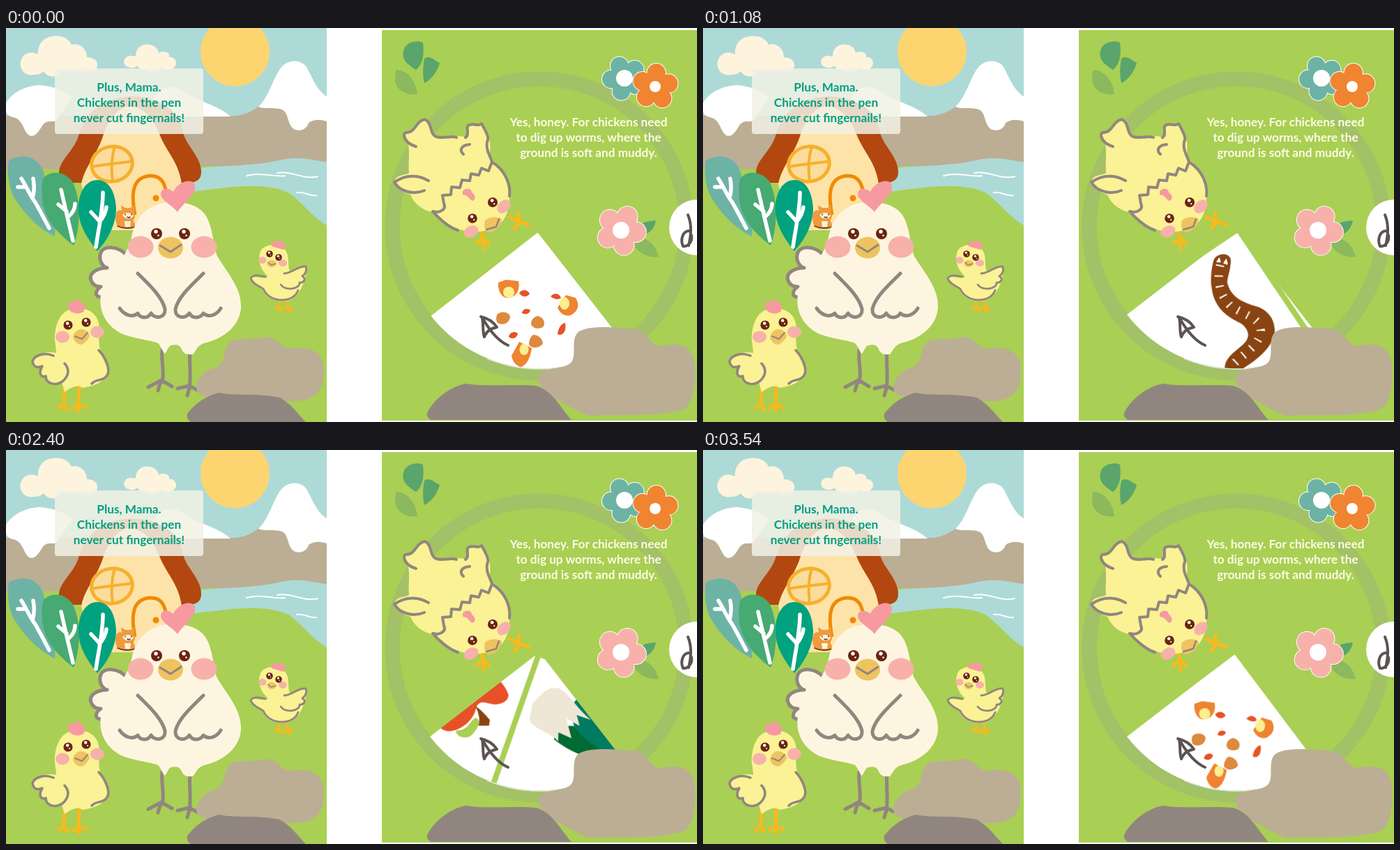
Animation, 991 px wide and 565 px high, one loop 4.17 s. Source, as an HTML page:

```html
<!DOCTYPE html>
<html lang="en">
<head>
<meta charset="utf-8">
<title>Chickens and the feed wheel</title>
<style>
html, body { margin: 0; width: 100%; height: 100%; overflow: hidden; background: #fff; }
svg { display: block; width: 100vw; height: 100vh; }
text { font: 700 17.2px Lato, "Open Sans", sans-serif; text-anchor: middle; }
.line { fill: none; stroke: #91867f; stroke-linecap: round; stroke-linejoin: round; }
.foot { fill: none; stroke: #f9b91c; stroke-linecap: round; stroke-linejoin: round; }
.ink { fill: none; stroke: #5b5453; stroke-width: 4; stroke-linecap: round; stroke-linejoin: round; }
.vein { fill: none; stroke: #fff; stroke-width: 5.5; stroke-linecap: round; stroke-linejoin: round; }
.ripple { fill: none; stroke: #fff; stroke-width: 2; stroke-linecap: round; }
.sky { fill: #addad7; } .grass { fill: #a9cf54; } .sand { fill: #bcae94; } .stone { fill: #91867f; }
.cream { fill: #fef5e1; } .chick { fill: #faf294; } .cheek { fill: #f7b1aa; } .comb { fill: #f799a0; } .beak { fill: #efc35f; }
#wheel { animation: turn 4170ms -1ms infinite; }
/* one quarter turn per dish, in 30 ms ticks */
@keyframes turn {
  0% { transform: rotate(0deg); animation-timing-function: steps(25, end); }
  17.98561% { transform: rotate(90deg); }
  25.17986% { transform: rotate(90deg); animation-timing-function: steps(22, end); }
  41.00719% { transform: rotate(180deg); }
  47.48201% { transform: rotate(180deg); animation-timing-function: steps(22, end); }
  63.30935% { transform: rotate(270deg); }
  70.50360% { transform: rotate(270deg); animation-timing-function: steps(20, end); }
  84.89209%, 100% { transform: rotate(361deg); }
}
</style>
</head>
<body>
<svg viewBox="0 0 991 565" preserveAspectRatio="none">
<defs>
  <g id="eye"><circle r="8" fill="#6b2410"/><circle cx="-1" cy="-3" r="2.7" fill="#fff"/><circle cx="2.5" cy="2.5" r="1.3" fill="#fff"/></g>
  <clipPath id="window"><path d="M765 290L608 411A199 199 0 0 0 887 447Z"/></clipPath>
</defs>

<!-- left page -->
<rect class="sky" width="460" height="565"/>
<circle cx="328.5" cy="34" r="49.5" fill="#fcd571"/>
<path fill="#fef4dd" d="M40 67C25 70 17 55 22 45C26 35 38 33 46 38C45 25 52 14 66 12C78 10 90 14 94 24C104 21 116 28 116 42C128 42 134 50 130 58C126 66 112 68 106 60C98 66 86 64 82 60C76 70 62 74 54 62C50 66 46 67 40 67ZM176 56C168 55 167 44 174 41C180 38 184 42 186 40C186 28 196 22 206 24C214 25 218 30 219 36C224 32 236 34 234 42C242 40 246 50 243 54C238 62 228 62 224 57C218 64 208 68 202 60C196 62 190 57 188 54C184 58 180 58 176 56Z"/>
<path class="sand" d="M0 126H330C345 124 355 118 363 112L460 100V220H0Z"/>
<path fill="#fff" d="M0 108C8 92 30 82 50 82C70 84 85 90 95 100L75 128C70 140 60 128 52 140C45 152 38 160 30 151C24 142 22 130 10 128C3 126 0 122 0 118ZM200 127C215 80 235 75 262 96C285 108 305 112 322 127ZM362 113C378 98 384 68 396 55C408 44 424 46 431 56C440 72 446 90 460 98V134C448 130 440 132 434 136C431 146 421 149 413 145C403 138 406 122 396 117C384 113 372 117 362 113Z"/>
<path class="grass" d="M0 204C40 200 70 203 100 203C180 200 230 200 280 198H460V565H0Z"/>
<path class="sky" d="M265 202C310 196 350 200 400 188C425 184 440 190 460 192V283C440 272 425 250 405 236C370 220 320 228 265 235Z"/>
<path class="ripple" d="M345 212C365 206 385 214 400 212M389 208C410 204 425 218 447 213M417 236C430 234 435 242 445 240"/>

<path fill="#b2480f" d="M76 208C76 190 96 178 104 155C112 125 135 100 180 98C225 100 250 120 254 150C258 168 280 185 280 206C280 220 270 222 257 222H95C84 222 77 216 76 208Z"/>
<path fill="#fee3a8" d="M108 224C112 200 132 180 140 152C150 125 165 112 178 112C195 112 212 130 220 152C230 178 248 192 252 224L245 290H125Z"/>
<g fill="none" stroke="#f6b02e" stroke-width="5">
  <ellipse cx="152" cy="195" rx="29.5" ry="25" fill="#fbdc9c" transform="rotate(-10 152 195)"/>
  <path stroke-width="4" d="M156 170C151 185 151 205 153 220M123 199C142 195 165 194 181 191"/>
</g>
<path fill="none" stroke="#f08a00" stroke-width="5" d="M185 268C178 232 184 214 206 212C224 211 229 224 231 244"/>
<circle cx="215" cy="244" r="4.5" fill="#f08a00"/>
<g>
  <path fill="#ef9a3c" d="M160 284C154 272 158 258 166 262L165 254L171 258L178 258L184 255L184 265C188 272 180 274 184 279C188 286 180 288 172 286Z"/>
  <path fill="#fff3dc" d="M167 268C171 264 179 264 183 269C180 275 170 275 167 268ZM170 277H179L178 285H171Z"/>
  <path fill="none" stroke="#6b3a1a" stroke-width="1.6" stroke-linecap="round" d="M171 267V268M180 267V268M174 271L176 272L178 271M160 284C168 288 178 288 185 285"/>
</g>

<path fill="#6db3a5" d="M4 190C20 180 50 180 56 215C60 245 73 270 70 299C45 287 25 265 10 240C2 220 2 205 4 190Z"/>
<path class="vein" d="M22 216C30 228 34 240 42 250C50 264 56 276 62 287M28 228L17 228M38 244C41 234 41 226 39 216"/>
<path fill="#46aa72" d="M54 215C65 203 85 206 95 220C108 245 107 285 97 312C75 295 55 275 52 245C51 230 51 222 54 215Z"/>
<path class="vein" d="M79 232C85 258 90 280 96 305M87 263L75 253M90 270C97 264 99 258 99 252"/>
<path fill="#00a27f" d="M131 218C150 218 158 240 158 262C156 290 140 310 131 320C115 300 103 280 104 258C104 235 115 218 131 218Z"/>
<path class="vein" d="M139 236C139 262 133 285 129 314M134 277L122 264M134 278C141 270 143 264 144 257"/>

<path class="line" style="fill:#fef5e1" stroke-width="5" d="M172 325C160 312 140 312 136 322C132 332 138 342 145 344C130 344 118 352 122 362C125 370 132 371 136 371C128 376 126 386 137 386"/>
<path class="line" stroke-width="5" d="M224 462C222 480 228 492 224 508M204 515L223 505L238 514M222 506L218 520M264 462C262 480 266 495 263 518M246 517L263 513L274 519M263 516L260 527"/>
<path class="cream" d="M237 250C205 250 186 270 180 300C174 330 150 345 140 368C128 398 140 425 165 438C185 446 210 448 218 452C222 456 224 462 227 467C231 466 232 456 237 455C245 453 250 455 252 461C256 470 264 468 268 468C272 464 274 455 284 452C315 445 336 425 337 400C338 370 312 345 302 325C295 300 296 270 275 258C262 250 250 250 237 250Z"/>
<path class="comb" d="M246 264C238 254 222 247 222 238C222 229 233 228 240 235C244 224 262 214 270 223C276 238 254 250 246 264Z"/>
<ellipse class="cheek" cx="193" cy="314" rx="18.5" ry="15.5"/><ellipse class="cheek" cx="284" cy="314" rx="18.5" ry="15.5"/>
<ellipse class="beak" cx="236" cy="315" rx="18" ry="15.5"/>
<path class="line" stroke-width="3" d="M221 312L236 321L251 311"/>
<use href="#eye" x="216" y="295"/><use href="#eye" x="256" y="295"/>
<path class="line" stroke-width="5" d="M189 352C205 368 224 385 228 403C229 416 214 418 208 409C203 418 192 416 189 409C182 416 170 412 163 402M283 352C267 368 247 385 243 403C242 416 257 418 263 409C268 418 279 416 283 409C290 416 302 412 308 402"/>

<path class="sand" d="M277 525C268 515 276 500 290 490C318 485 310 465 318 455C325 440 350 450 372 443C392 444 394 460 408 460C428 456 448 460 454 478C458 495 456 520 440 529C415 542 380 530 340 536C310 536 290 530 277 525Z"/>
<path class="stone" d="M260 553C270 540 285 528 305 523C330 528 360 523 393 530C410 540 420 555 430 565H265C260 562 259 557 260 553Z"/>

<path class="foot" stroke-width="5" d="M84 515L83 542M76 545L83 540L88 547M105 513L104 542M96 545L104 540L115 544M104 540V549"/>
<path class="chick" d="M72 466C55 462 40 470 38 478C40 488 46 487 52 485C46 495 50 502 58 500C58 510 68 512 80 508L84 522C98 512 106 512 109 516C128 514 142 506 146 496C146 480 130 465 134 440C136 415 125 402 102 402C80 402 72 420 70 440C69 450 72 456 72 466Z"/>
<path class="line" stroke-width="3.5" d="M68 470C55 464 40 470 38 478C40 488 46 487 52 485C46 495 50 502 57 499C57 512 75 514 84 504C89 498 92 490 84 481M133 462C144 474 150 490 145 498C138 508 130 502 123 510"/>
<path class="comb" d="M90 404C87 394 93 389 99 394C101 386 107 388 107 394C114 393 115 400 111 407C104 411 96 410 90 404Z"/>
<ellipse class="cheek" cx="81" cy="443" rx="10" ry="8.5"/><ellipse class="cheek" cx="131" cy="436" rx="10" ry="8.5"/>
<path class="beak" d="M96 444C98 434 106 431 109 432C116 433 120 438 120 442C116 450 110 454 107 454C101 453 98 449 96 444Z"/>
<path class="line" stroke-width="2" d="M99 442L109 446L117 437"/>
<use href="#eye" transform="translate(89 426) scale(.82)"/><use href="#eye" transform="translate(115 422) scale(.82)"/>

<path class="foot" stroke-width="3.5" d="M392 388V402M386 402L392 400L396 406M403 390L405 403M398 403L405 401L411 403M405 402V408"/>
<path class="chick" d="M365 320C370 308 400 306 404 326C406 338 404 344 408 350C418 346 426 342 431 344C430 366 420 386 404 391C384 394 370 384 368 374C360 370 352 366 351 358C358 354 368 362 376 356C366 348 360 334 365 320Z"/>
<path class="line" stroke-width="2.8" d="M399 352C410 352 420 340 430 342C432 350 428 354 425 356C432 360 426 366 421 365C422 374 402 378 394 368M372 357C362 354 354 354 351 359C354 368 364 370 369 374C374 386 386 390 396 390C408 390 416 384 419 376"/>
<path class="comb" d="M381 313C378 306 386 304 389 308C391 302 396 304 396 308C402 307 402 314 398 318Z"/>
<ellipse class="cheek" cx="368" cy="333" rx="5.5" ry="5"/><ellipse class="cheek" cx="397" cy="337" rx="6" ry="5"/>
<ellipse class="beak" cx="381" cy="338" rx="6.5" ry="5"/>
<path class="line" stroke-width="1.5" d="M376 336L380 340L387 338"/>
<use href="#eye" transform="translate(378 324) scale(.6)"/><use href="#eye" transform="translate(391 329) scale(.6)"/>

<rect x="70" y="58" width="213" height="94" rx="4" fill="#f1f1e5" fill-opacity=".86"/>
<g fill="#009e80"><text x="176.5" y="91">Plus, Mama.</text><text x="176.5" y="113">Chickens in the pen</text><text x="176.5" y="135">never cut fingernails!</text></g>

<!-- right page -->
<rect class="grass" x="539" y="3" width="452" height="560"/>
<circle cx="765" cy="284" r="211" fill="none" stroke="#a3c166" stroke-width="21"/>
<path fill="#5aa56b" d="M570 33C572 20 590 17 598 21C600 38 598 52 588 60C575 52 567 45 570 33ZM600 44C608 38 616 48 622 50C618 65 608 75 600 79C597 66 598 55 600 44ZM903 296C905 278 920 277 932 276C930 290 918 300 903 296Z"/>
<path fill="#8cb85e" d="M559 60C575 60 588 75 590 95C575 97 560 90 558 75ZM897 303C915 296 931 308 936 328C920 330 903 322 897 303Z"/>
<g id="flowers"></g>
<circle cx="991" cy="286" r="40" fill="#fff"/>
<path class="ink" d="M978 268C984 282 983 296 979 312M981 291C970 290 967 304 971 313C978 314 985 306 983 297"/>

<path class="foot" stroke-width="5" d="M680 290L685 302L675 308M685 302L685 317M685 302L693 309M722 271L736 278L735 266M736 278L750 282M736 278L729 288"/>
<path class="chick" d="M572 152C590 150 585 133 601 131C612 137 608 152 617 156C630 160 645 152 662 157C668 152 658 142 666 140C680 134 690 142 692 156C696 166 694 178 693 186C718 203 724 225 722 245C722 262 715 285 690 290C660 298 632 285 614 264C600 263 586 254 580 239C570 236 560 230 557 220C560 210 570 212 578 208C576 190 582 172 572 152Z"/>
<path class="line" stroke-width="4" d="M588 170C574 166 567 154 573 150C589 150 586 134 601 131C612 137 607 152 617 156C628 159 638 154 646 157M659 157C666 152 658 142 664 139C674 136 678 142 682 137C688 148 694 158 690 163C688 176 694 182 697 192M665 167C652 168 650 176 656 181M606 219C594 212 576 208 557 221C564 234 584 240 600 233"/>
<path class="line" stroke-width="4" d="M648 290C634 286 618 270 612 263C622 266 632 260 628 252L626 240L638 239L639 228L651 229L654 218L665 219L667 209L678 211L682 201L692 205L697 192C716 204 724 224 722 241"/>
<path class="comb" d="M655 234C660 228 668 230 668 236C674 240 674 246 669 248C664 246 664 240 655 239Z"/>
<ellipse class="cheek" cx="667" cy="292" rx="11" ry="8" transform="rotate(-25 667 292)"/><ellipse class="cheek" cx="714" cy="256" rx="11" ry="8" transform="rotate(-45 714 256)"/>
<path class="beak" d="M687 276C694 270 706 270 711 275C710 285 700 294 691 293C686 290 685 282 687 276Z"/>
<path class="line" stroke-width="2.5" d="M689 289L703 285L707 274"/>
<use href="#eye" transform="translate(669 273) scale(.85)"/><use href="#eye" transform="translate(698 250) scale(.88)"/>

<g clip-path="url(#window)">
<g transform="translate(765 290)">
<g id="wheel">
  <circle r="199" fill="#fff"/>
  <g stroke="#a9cf54" stroke-width="8">
    <path transform="rotate(-38)" d="M0 -3V202"/>
    <path transform="rotate(-128)" d="M3 -3V202"/>
    <path transform="rotate(-218)" d="M0 -3V202"/>
    <path transform="rotate(52)" d="M-3 -3V202"/>
  </g>
  <g transform="translate(-765 -290)">
    <path fill="#ee8430" d="M706 365L717 361L735 363C738 378 730 386 720 387C712 388 705 378 706 365ZM803 383L817 387C823 397 821 406 810 412C800 414 794 408 791 401ZM736 450L754 459C752 475 745 485 738 486C730 484 726 476 725 470Z"/>
    <g fill="#faf08f"><circle cx="721" cy="379" r="8"/><ellipse cx="801" cy="395" rx="7" ry="9"/><ellipse cx="743" cy="461" rx="6.5" ry="8"/></g>
    <path fill="#dd8a3e" d="M705 410C712 405 722 408 723 414C722 424 712 427 705 423C702 418 703 413 705 410ZM762 413C770 414 775 422 770 429C762 433 753 430 753 423C754 417 758 414 762 413ZM756 440C764 440 770 446 770 453C764 460 754 460 750 454C750 448 752 443 756 440Z"/>
    <path fill="#e85127" d="M736 380C740 374 748 375 751 381C748 386 740 387 736 380ZM781 385C786 379 793 380 796 387C791 391 785 388 781 385ZM740 409C741 402 748 401 752 405C750 411 744 411 740 409ZM721 443C722 436 730 434 734 438C733 445 726 447 721 443ZM791 439C792 430 797 423 802 423C804 434 799 443 791 439Z"/>
  </g>
  <g transform="rotate(-94.09) translate(-765 -290)" fill="none">
    <path fill="#8a4412" d="M732 334C736 322 756 321 757 333C757 348 751 358 752 366C758 388 776 394 796 400C812 406 821 420 820 437C816 458 798 474 772 490L748 489C748 470 768 462 778 450C786 440 780 430 772 424C756 416 742 408 734 390C726 370 728 350 732 334Z"/>
    <path stroke="#fff" stroke-width="12" stroke-dasharray="2 13" stroke-dashoffset="-20" d="M743 335C736 360 740 382 756 398C776 412 798 414 800 434C798 456 776 466 761 482"/>
    <path stroke="#fff" stroke-width="3" stroke-linecap="round" d="M738 335L740 332L741 335M748 337L750 334L751 338"/>
  </g>
  <g transform="rotate(-184.09) translate(-765 -290)">
    <path fill="#a9cf54" d="M785 420C795 412 802 432 802 442C798 455 788 457 783 453C794 440 784 430 785 420Z"/>
    <path fill="#e85127" d="M706 383C700 375 704 364 716 363C732 362 742 368 751 365C758 359 775 358 787 362C795 368 792 380 785 388C776 396 768 400 774 410C788 425 787 450 777 463C765 475 740 471 720 457C705 450 694 446 694 434C699 424 694 412 695 402C697 394 703 390 706 383Z"/>
    <path fill="#faf294" d="M724 378L735 374L740 366L749 376L758 377L753 392L742 398L730 391Z"/>
    <path fill="#8a4412" d="M771 410C782 406 792 406 800 405L806 411L797 423C790 414 780 411 771 410Z"/>
  </g>
  <g transform="rotate(-274.55) translate(-765 -290)">
    <path fill="#006b32" d="M706 402C720 390 740 395 750 420C758 445 760 465 749 467C725 455 712 425 706 402Z"/>
    <path fill="#007a60" d="M740 405C750 380 765 370 775 380C797 400 812 430 810 453C804 477 780 482 758 474C752 455 738 430 740 405Z"/>
    <path fill="#efe7d6" d="M694 364C696 352 703 355 708 346C716 339 728 341 738 339C751 341 757 346 759 357C762 372 760 392 765 412L753 394L747 409L738 389L727 416L717 398L709 408C708 392 697 382 694 364Z"/>
  </g>
</g>
</g>
</g>
<path fill="none" stroke="#e2e6dc" stroke-width="1.5" d="M690 474A199 199 0 0 0 815 483"/>
<path class="ink" d="M720 455C706 449 695 436 684 417M681 414C690 416 698 420 704 429C696 431 690 433 686 443C683 434 685 424 683 416"/>
<path class="sand" d="M764 498C775 485 800 490 810 480C820 470 808 445 822 435C840 425 880 430 905 432C925 440 922 455 940 456C960 451 980 453 986 473C991 490 990 530 975 545C940 560 870 553 835 556C800 540 775 525 766 512C763 505 763 502 764 498Z"/>
<path class="stone" d="M604 552C615 530 640 513 660 510C690 515 730 510 760 513C785 520 795 545 811 562H609C605 559 603 556 604 552Z"/>
<g fill="#fffbe6"><text x="835.5" y="141">Yes, honey. For chickens need</text><text x="835.5" y="163">to dig up worms, where the</text><text x="835.5" y="185">ground is soft and muddy.</text></g>
</svg>
<script>
const NS = "http://www.w3.org/2000/svg";
const flowers = document.getElementById("flowers");

function add(name, attrs) {
  const el = document.createElementNS(NS, name);
  for (const key in attrs) el.setAttribute(key, attrs[key]);
  flowers.append(el);
}

// five round petals: a white rim first, then the fill on top
function flower(x, y, size, tilt, color, heart) {
  for (const [fill, rim] of [["#fff", 1], [color, 0]]) {
    for (let i = 0; i < 5; i++) {
      const a = (tilt + i * 72) * Math.PI / 180;
      add("circle", { cx: x + size * 0.6 * Math.cos(a), cy: y + size * 0.6 * Math.sin(a), r: size * 0.4 + rim, fill });
    }
  }
  add("circle", { cx: x, cy: y, r: size * 0.5, fill: color });
  add("circle", { cx: x, cy: y, r: heart, fill: "#fff" });
}

flower(887, 72, 32, -112, "#6db3a5", 12);
flower(931, 84, 33, -85, "#f08430", 8);
flower(882, 290, 36, -65, "#f7b1aa", 12);
</script>
</body>
</html>
```
